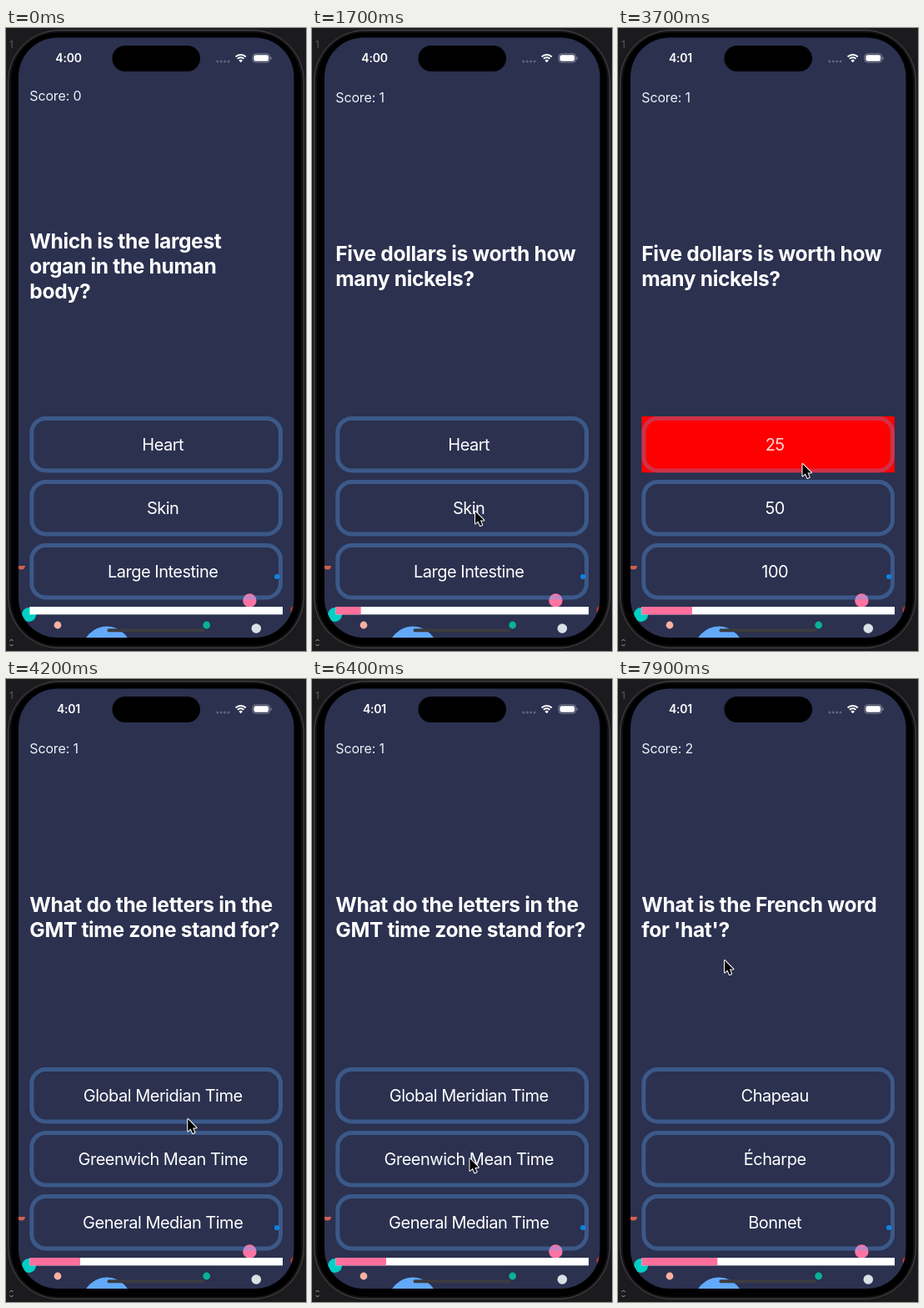
An HTML page with a canvas for the animation above (8000 ms loop, 360x746 px).

```html
<!DOCTYPE html>
<html lang="en">
<head>
<meta charset="utf-8">
<title>Quiz</title>
<style>
html, body { margin: 0; width: 100%; height: 100%; overflow: hidden; background: #1b1b1d; }
canvas { display: block; width: 360px; height: 746px; }
</style>
</head>
<body>
<canvas id="stage"></canvas>
<script>
const W = 360, H = 746, LOOP = 8000;
const FONT = 'Inter, "Open Sans", sans-serif';
const BG = '#2b314f', PINK = '#ff6f9c';
const HOLD = 500, FADE = 370, SWAP = 180;

const canvas = document.getElementById('stage');
const dpr = window.devicePixelRatio || 1;
canvas.width = W * dpr;
canvas.height = H * dpr;
const ctx = canvas.getContext('2d');

// tap: time of the answer, pick: chosen button
const quiz = [
  { lines: ['Which is the largest', 'organ in the human', 'body?'],
    options: ['Heart', 'Skin', 'Large Intestine'], tap: 1200, pick: 1, color: '#00ff00', score: 0 },
  { lines: ['Five dollars is worth how', 'many nickels?'],
    options: ['25', '50', '100'], tap: 3400, pick: 0, color: '#ff0000', score: 1 },
  { lines: ['What do the letters in the', 'GMT time zone stand for?'],
    options: ['Global Meridian Time', 'Greenwich Mean Time', 'General Median Time'],
    tap: 6800, pick: 1, color: '#00ff00', score: 1 },
  { lines: ['What is the French word', "for 'hat'?"],
    options: ['Chapeau', 'Écharpe', 'Bonnet'], tap: Infinity, score: 2 }
];

// time, x, y of the pointer tip
const path = [
  [550, 366, 660], [1050, 195, 578], [2250, 195, 578], [2600, 195, 526], [3000, 195, 526],
  [3300, 220.5, 521], [4050, 220.5, 521], [4500, 208, 540], [5300, 208, 540], [5800, 196, 562],
  [6500, 188, 574], [6800, 188, 574], [7100, 162, 677], [7200, 162, 677], [7750, 127, 336], [8000, 127, 336]
];

const bubbles = [
  [27.5, 702.5, 8.5, '#00cfc5'], [62, 715, 4.4, '#fab1a0'], [121, 746, 29.5, '#62a9fa'],
  [240.7, 715, 4.4, '#08b294'], [300.3, 719, 5.8, '#d9e1e4'], [292.4, 685.5, 8.2, '#fd73a2'],
  [325, 657, 3, '#0984e3'], [347, 697, 5.5, '#c43a3a']
];

const clamp = v => Math.max(0, Math.min(1, v));
const ease = v => v * v * (3 - 2 * v);

function round(x, y, w, h, r) {
  ctx.beginPath();
  ctx.roundRect(x, y, w, h, r);
}

function fillRound(x, y, w, h, r, color) {
  round(x, y, w, h, r);
  ctx.fillStyle = color;
  ctx.fill();
}

function disc(x, y, r, color, from = 0, to = Math.PI * 2) {
  ctx.beginPath();
  ctx.arc(x, y, r, from, to);
  ctx.fillStyle = color;
  ctx.fill();
}

function text(str, x, y, size, weight, spacing, align = 'left', color = '#fff') {
  ctx.font = `${weight} ${size}px ${FONT}`;
  ctx.letterSpacing = spacing + 'px';
  ctx.textAlign = align;
  ctx.fillStyle = color;
  ctx.fillText(str, x, y);
}

function drawBody() {
  ctx.fillStyle = '#1b1b1d';
  ctx.fillRect(0, 0, W, H);
  text('1', 4, 24, 12, 400, 0, 'left', '#5b5b60');
  ctx.strokeStyle = '#a5a5a8';
  ctx.lineWidth = 1;
  ctx.beginPath();
  ctx.moveTo(4.5, 734); ctx.lineTo(6.5, 732); ctx.lineTo(8.5, 734);
  ctx.moveTo(4.5, 738); ctx.lineTo(6.5, 740); ctx.lineTo(8.5, 738);
  ctx.stroke();
  fillRound(2, 2, 356, 741, 62, '#3c3c3e');
  fillRound(3.5, 3.5, 353, 738, 60, '#111113');
  fillRound(6, 5.5, 348, 734, 57, '#000');
}

function drawStatus(t) {
  text(t < 3300 ? '4:00' : '4:01', 75, 41.3, 14, 600, -0.25, 'center');
  fillRound(127.5, 21, 105.5, 31, 15.5, '#000');
  for (let i = 0; i < 4; i++) disc(253.8 + i * 4.4, 40, 1.5, '#60657f');
  ctx.strokeStyle = '#fff';
  ctx.lineWidth = 2;
  for (const r of [8.6, 5.3]) {
    ctx.beginPath();
    ctx.arc(281.7, 40.6, r, -Math.PI * 0.75, -Math.PI * 0.25);
    ctx.stroke();
  }
  ctx.beginPath();
  ctx.moveTo(281.7, 41.2);
  ctx.arc(281.7, 41.2, 3.2, -Math.PI * 0.75, -Math.PI * 0.25);
  ctx.fillStyle = '#fff';
  ctx.fill();
  round(296, 30.8, 20.6, 10.4, 3.4);
  ctx.strokeStyle = '#898da0';
  ctx.lineWidth = 0.9;
  ctx.stroke();
  fillRound(297.4, 32.2, 17.8, 7.6, 2.2, '#fff');
  fillRound(317.5, 34.4, 1.2, 3.3, 0.6, '#898da0');
}

function drawOption(i, t, q, prev) {
  const y = 465 + i * 76;
  let alpha = 1;
  if (q.pick === i && t > q.tap - 100) {
    alpha = 0.2 + 0.8 * clamp((t - q.tap) / FADE);
    if (t >= q.tap) {
      ctx.fillStyle = q.color;
      ctx.fillRect(28.4, y, 303.6, 67.3);
    }
  }
  ctx.globalAlpha = alpha;
  round(30.8, y + 2.6, 298.7, 62.4, 17);
  ctx.strokeStyle = 'rgba(91,168,250,.34)';
  ctx.lineWidth = 5;
  ctx.stroke();
  const label = (str, a) => {
    ctx.globalAlpha = a;
    text(str, 188.2, y + 41.3, 20, 400, -0.5, 'center');
  };
  const swap = prev ? clamp((t - prev.tap - HOLD) / SWAP) : 1;
  if (swap < 1) label(prev.options[i], 1 - swap);
  label(q.options[i], alpha * swap);
  ctx.globalAlpha = 1;
}

function drawScreen(t) {
  const n = quiz.findIndex(q => t < q.tap + HOLD);
  const q = quiz[n];
  ctx.save();
  round(15, 11.5, 330.5, 718.5, 47);
  ctx.clip();
  ctx.fillStyle = BG;
  ctx.fillRect(15, 11, 331, 720);
  for (const b of bubbles) disc(...b);
  disc(18.5, 644, 4.5, '#d2604f', 0, Math.PI);

  drawStatus(t);
  text('Score: ' + q.score, 28.3, q.score ? 89 : 87, 16, 400, -0.15, 'left', '#eef0f6');
  const top = 309 - q.lines.length * 15;
  q.lines.forEach((line, i) => text(line, 28.3, top + i * 30, 24.6, 700, -0.37));
  for (let i = 0; i < 3; i++) drawOption(i, t, q, quiz[n - 1]);

  const done = quiz.filter(k => t >= k.tap).length;
  ctx.fillStyle = '#fff';
  ctx.fillRect(28.4, 693, 303.6, 9.3);
  ctx.fillStyle = PINK;
  ctx.fillRect(28.4, 693, 30.3 * done, 9.3);
  fillRound(121.5, 719.2, 117, 4, 2, '#3b3b40');
  ctx.restore();
}

function drawPointer(t) {
  if (t < path[0][0]) return;
  const k = path.findIndex(p => p[0] > t);
  const [t0, x0, y0] = path[k - 1], [t1, x1, y1] = path[k];
  const u = ease((t - t0) / (t1 - t0));
  ctx.save();
  ctx.translate(x0 + (x1 - x0) * u, y0 + (y1 - y0) * u);
  ctx.beginPath();
  [[1, 1], [1, 15.5], [4.4, 12.4], [6.8, 18], [9.2, 17], [6.9, 11.6], [11.4, 11.4]]
    .forEach(([x, y]) => ctx.lineTo(x, y));
  ctx.closePath();
  ctx.lineJoin = 'round';
  ctx.strokeStyle = '#fff';
  ctx.lineWidth = 2;
  ctx.stroke();
  ctx.fillStyle = '#000';
  ctx.fill();
  ctx.restore();
}

function frame(now) {
  const t = now % LOOP;
  ctx.setTransform(dpr, 0, 0, dpr, 0, 0);
  drawBody();
  drawScreen(t);
  drawPointer(t);
  requestAnimationFrame(frame);
}
requestAnimationFrame(frame);
</script>
</body>
</html>
```
